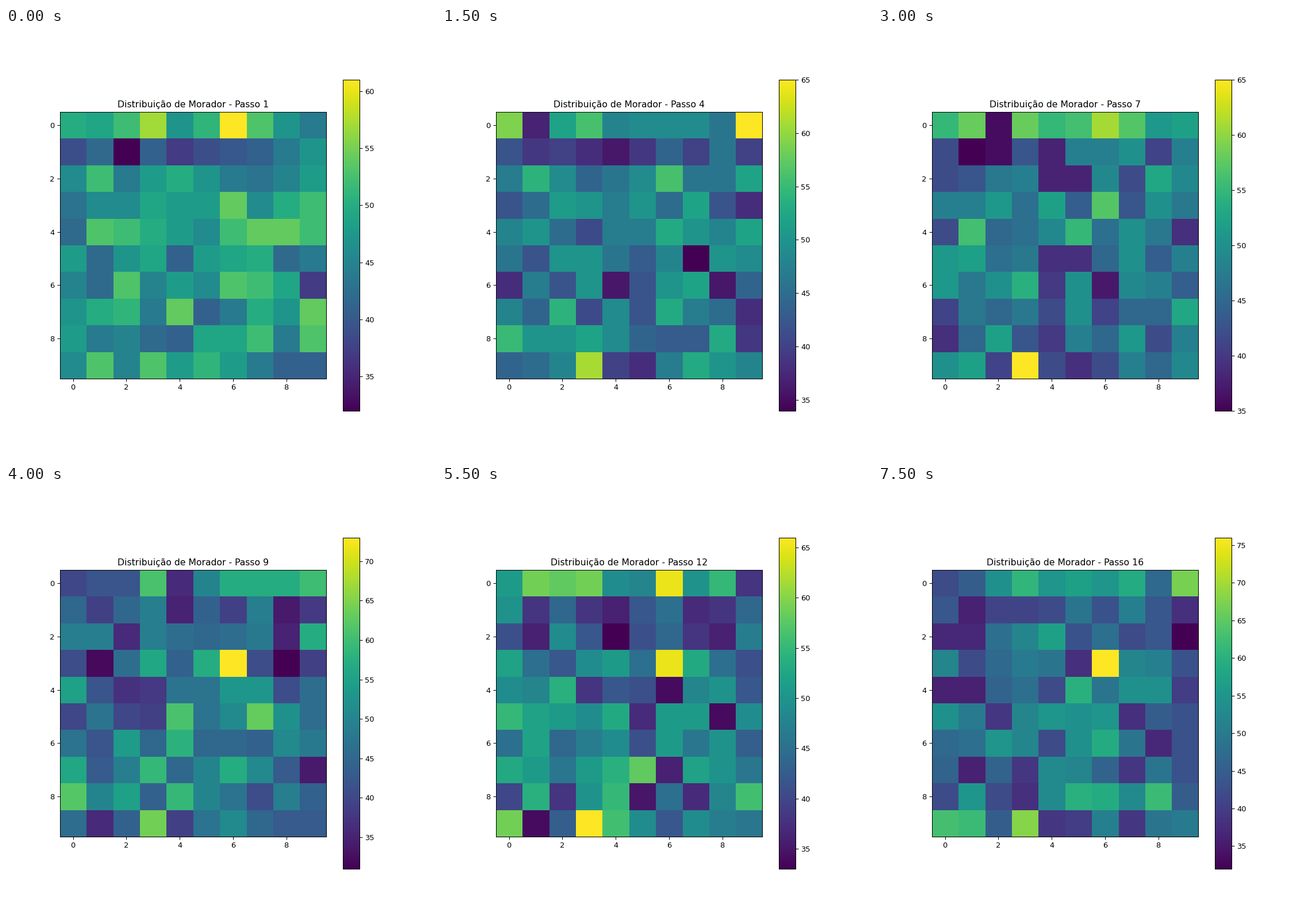
A matplotlib script for the animation above (8 s loop, 748 by 748 pixels).

```python
import matplotlib.pyplot as plt
import numpy as np
from matplotlib.animation import FuncAnimation
from matplotlib.ticker import MultipleLocator

SIZE, INCHES = 748, 8
STEP_MS = 500
CELLS = 10
MEAN = 47

# smallest and largest cell count at each step
LOWS = [32, 31, 30, 34, 33, 32, 35, 30, 31, 28, 32, 33, 29, 26, 30, 32]
HIGHS = [61, 64, 69, 65, 66, 65, 65, 67, 73, 71, 64, 66, 65, 65, 70, 76]

# cells (row, column) that stay crowded
CROWDED = [(0, 3), (0, 6), (3, 6), (9, 3)]


def habits():
    """Lasting preference of each cell, in units of the random spread."""
    pull = np.zeros((CELLS, CELLS))
    pull[0] += 0.5
    pull[1] -= 0.9
    for cell in CROWDED:
        pull[cell] = 2
    return pull


def counts(step):
    rng = np.random.default_rng(step)
    crowd = HABITS + rng.normal(0, 0.8, HABITS.shape)
    span = [crowd.min(), 0, crowd.max()]
    return np.rint(np.interp(crowd, span, [LOWS[step], MEAN, HIGHS[step]]))


HABITS = habits()

plt.rcParams["font.family"] = "DejaVu Sans"
fig, ax = plt.subplots(figsize=(INCHES, INCHES), dpi=SIZE / INCHES)
image = ax.imshow(counts(0), cmap="viridis")
fig.colorbar(image, ax=ax, ticks=MultipleLocator(5))
title = ax.set_title("")


def update(step):
    image.set_data(counts(step))
    image.set_clim(LOWS[step], HIGHS[step])
    title.set_text(f"Distribuição de Morador - Passo {step + 1}")
    return image, title


anim = FuncAnimation(fig, update, frames=len(LOWS), interval=STEP_MS,
                     repeat=True, repeat_delay=0, blit=False)
plt.show()
```
